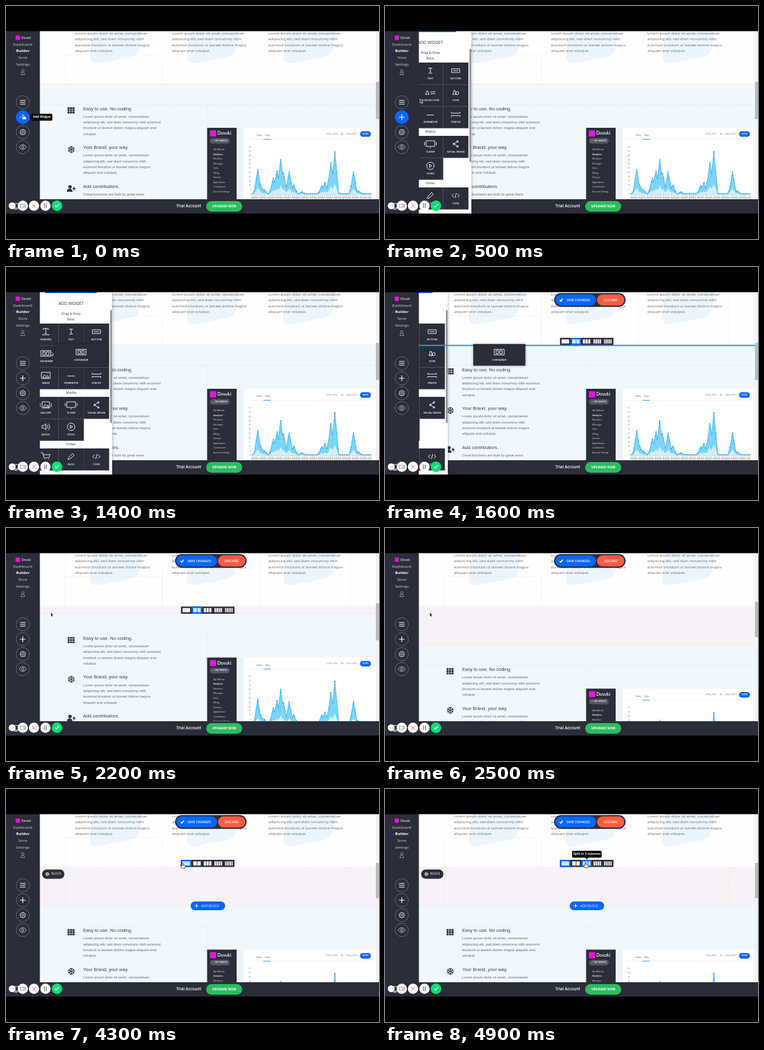
Animation of 600 by 375 pixels, one loop 5000 ms. Source, as an HTML page with a canvas:

```html
<!DOCTYPE html>
<html lang="en">
<head>
<meta charset="utf-8">
<title>Page builder demo</title>
<style>
html, body { margin: 0; width: 100%; height: 100%; overflow: hidden; background: #000; }
canvas { display: block; width: 600px; height: 375px; }
</style>
</head>
<body>
<canvas id="stage" width="600" height="375"></canvas>
<script>
const ctx = document.getElementById('stage').getContext('2d');
const LOOP = 5000, STEP = 100, PANEL_TRAVEL = 128;
const DARK = '#2b2d39', BLUE = '#0866ff', WHITE = '#fff', GREY = '#666b72', EDGE = '#d9dde2', PINK = '#e416e0';
const SANS = '"Open Sans", sans-serif', ARIAL = '"Liberation Sans", Arial, sans-serif';
const BRAND = 'Dovuki';

const ease = (t, from, to) => {
  const p = Math.min(1, Math.max(0, (t - from) / (to - from)));
  return p * p * (3 - 2 * p);
};

function box(x, y, w, h, color, r = 0) {
  ctx.fillStyle = color;
  ctx.beginPath();
  ctx.roundRect(x, y, w, h, r);
  ctx.fill();
}
function disc(x, y, r, fill, stroke) {
  ctx.beginPath();
  ctx.arc(x, y, r, 0, 7);
  if (fill) { ctx.fillStyle = fill; ctx.fill(); }
  if (stroke) { ctx.strokeStyle = stroke; ctx.lineWidth = .8; ctx.stroke(); }
}
function path(d, x, y, stroke, width = .8, fill) {
  const p = new Path2D(d);
  ctx.save();
  ctx.translate(x, y);
  if (fill) { ctx.fillStyle = fill; ctx.fill(p); }
  if (stroke) { ctx.strokeStyle = stroke; ctx.lineWidth = width; ctx.stroke(p); }
  ctx.restore();
}
function dashed(d) {
  ctx.setLineDash([1.5, 1.5]);
  path(d, .5, .5, EDGE, .6);
  ctx.setLineDash([]);
}
function text(s, x, y, size, color = WHITE, align = 'left', weight = 400, font = SANS) {
  ctx.font = `${weight} ${size}px ${font}`;
  ctx.fillStyle = color;
  ctx.textAlign = align;
  ctx.textBaseline = 'middle';
  ctx.fillText(s, x, y);
}
function gear(x, y, r, color) {
  disc(x, y, r, null, color);
  disc(x, y, r * .4, null, color);
  ctx.setLineDash([r * .39, r * .39]);
  ctx.lineWidth = r * .3;
  ctx.beginPath();
  ctx.arc(x, y, r * 1.15, 0, 6.283);
  ctx.stroke();
  ctx.setLineDash([]);
}
function shadowed(blur, paint) {
  ctx.shadowColor = '#0006';
  ctx.shadowBlur = blur;
  paint();
  ctx.shadowBlur = 0;
}

// Page
const INTRO = ['Lorem ipsum dolor sit amet, consectetuer', 'adipiscing elit, sed diam nonummy nibh',
  'euismod tincidunt ut laoreet dolore magna', 'aliquam erat volutpat.'];
const FEATURES = [
  ['Easy to use. No coding.', INTRO[0], INTRO[1] + ' euismod', 'tincidunt ut laoreet dolore magna aliquam erat', 'volutpat.'],
  ['Your Brand, your way.', ...INTRO],
  ['Add contribuitors.', 'Great business are built by great team.', 'Invite members to work on your website.']
];

function drawIntro(allColumns) {
  box(54, 40, 546, 86, '#fefefe');
  for (const x of [0, 156, 311]) {
    path('M140 40L135 81Q135 93 148 92L200 82Q213 79 215 67L220 40Z', x, 0, null, 0, '#ecf5fb');
    INTRO.forEach((line, i) => text(line, 111 + x, 44.5 + i * 9.3, 6, GREY));
  }
  dashed('M95 78H251V125M95 78V125');
  if (allColumns) dashed('M95 40V125M251 40V125M407 40V125M553 40V125');
}

function drawFeatures(push) {
  box(54, 126 + push, 546, 260, '#f0f7fd');
  dashed(`M54 125H595M54 ${125 + push}H595M54 ${158 + push}H595M323 ${158 + push}V${196 + push}`);
  FEATURES.forEach(([title, ...lines], i) => {
    const y = 165.5 + push + i * 62.5;
    text(title, 124, y, 7.5, '#3c4046', 'left', 400, ARIAL);
    lines.forEach((line, k) => text(line, 124, y + 12.7 + k * 9.3, 5.8, GREY, 'left', 400, ARIAL));
  });
  for (let i = 0; i < 9; i++) box(99 + i % 3 * 4, 163 + push + (i / 3 | 0) * 3.5, 3.4, 2.9, '#34363f', .4);
  for (let i = 0; i < 6; i++) {
    ctx.save();
    ctx.translate(105, 231 + push);
    ctx.rotate(i * Math.PI / 3);
    path('M0 0V-5.5M-2-5L0-3L2-5', 0, 0, '#34363f', 1.1);
    ctx.restore();
  }
  disc(103, 291 + push, 2.8, '#34363f');
  path('M-6 5Q-6 0-2 0Q3 0 3 5ZM3-1H8V.4H3ZM4.8-3H6.2V3H4.8Z', 104, 294 + push, null, 0, '#34363f');
}

// Chart: a tent around each peak, the highest one wins
const PEAKS = [[405, 40], [410, 14], [416, 7], [430, 26], [436, 38], [442, 56], [446.5, 34], [455.5, 36],
  [463, 15], [476, 4], [508, 14], [513, 19], [522.5, 51], [529, 69], [559, 36], [567, 5]];
const chartValue = x => Math.max(.8, ...PEAKS.map(([px, h]) => h * (1 - Math.abs(x - px) / 6.5)));
const DAYS = Array.from({ length: 60 }, (_, i) => 396 + i * 3.24);
const CHART_XS = [...DAYS, ...PEAKS.map(p => p[0])].sort((a, b) => a - b);

function drawChart() {
  const area = k => 'M396 303' + CHART_XS.map(x => `L${x} ${303 - chartValue(x) * k}`).join('') + 'V303Z';
  for (let i = 0; i < 12; i++) text(i * 5, 394, 303 - i * 6.9, 3, '#777', 'right');
  path(area(1), 0, 0, '#2aaeea', .8, '#7dd4fa');
  path(area(.25), 0, 0, null, 0, '#d6edf6');
  CHART_XS.forEach(x => disc(x, 303 - chartValue(x), .8, '#139ddd'));
  DAYS.forEach((x, i) => {
    ctx.save();
    ctx.translate(x, 305);
    ctx.rotate(-Math.PI / 2);
    text(`${i % 30 + 1} Dec`, 0, 0, 2.8, '#555', 'right');
    ctx.restore();
  });
}

function drawDashboard(push) {
  ctx.save();
  ctx.translate(0, push);
  box(371, 196, 224, 180, WHITE);
  box(371, 196, 11, 180, '#edf2f8');
  box(323.5, 196, 47.5, 180, DARK);
  box(328, 200, 10, 10, PINK, 1);
  text(BRAND, 340, 205.3, 7, WHITE, 'left', 600, 'Lato, sans-serif');
  box(328, 212.5, 32, 9, '#555762', 4.5);
  text('✓  EDIT WEBSITE', 344, 217, 3, WHITE, 'center', 600);
  ['My Website', 'Analytics', 'Members', 'Messages', 'Stats', 'Billing', 'Domain', 'Applications', 'Contributors', 'Account Settings']
    .forEach((s, i) => text(s, 333.5, 231.5 + i * 7.5, 3.4, '#e4e5e9', 'left', i == 1 ? 700 : 400));
  path('M383 214.5H588', 0, 0, '#e4e7ec', .5);
  path('M414 214.5H426', 0, 0, '#189de4', .9);
  text('Yearly', 403, 208.5, 3.2, '#555');
  text('Daily', 417, 208.5, 3.2, '#555');
  text('12 Dec, 2016', 515, 206, 3, '#666');
  text('By', 539, 206, 3, '#666');
  text('20 Jan, 2019', 547, 206, 3, '#666');
  box(569.5, 201.5, 17.5, 9, BLUE, 4.5);
  text('FILTER', 578.2, 206, 2.9, WHITE, 'center', 700);
  drawChart();
  ctx.restore();
}

// Widget panel: label and icon outline, three per row
const ICONS = {
  HEADING: 'M-4-3V-5H4V-3M0-5V3M-1.5 3H1.5M-6 5H6',
  TEXT: 'M-2.5-3V-4H2.5V-3M0-4V2M-1 2H1M-3 4H3',
  BUTTON: 'M-6.5-3H6.5V3H-6.5ZM-4 0H4',
  CONTAINER: 'M-8-4.5H8V4.5H-8ZM-5-2.5H-1V2.5H-5ZM1-2.5H5V2.5H1Z',
  'ICON SECTION': 'M-8 3L-5-3L-2 3ZM0-1H8M0 2H8',
  ICON: 'M-5 3L-2-4L1 3ZM0 1a2.5 2.5 0 1 0 5 0a2.5 2.5 0 1 0-5 0',
  IMAGE: 'M-7-5H7V5H-7ZM-5 3.5L-2-1L1 2L3 0L5 3.5ZM3-3h1',
  SEPARATOR: 'M-6 1H6',
  SPACER: 'M-7-4V-2H7V-4M-7 4V2H7V4',
  GALLERY: 'M-6-5H6V5H-6ZM-4 3.5L-1-1L2 2L3 0L5 3.5ZM-9-3V3M9-3V3',
  SLIDER: 'M-7-5H7V4H-7ZM-9.5-3V2M9.5-3V2M-1 6H1',
  'SOCIAL MEDIA': 'M3-4L-3 0L3 4M2-5h2v2h-2zM-4-1h2v2h-2zM2 3h2v2h-2z',
  AUDIO: 'M-6-2H-3L0-5V5L-3 2H-6ZM2-3q3 3 0 6M4-5q5 5 0 10',
  VIDEO: 'M-6 0a6 6 0 1 0 12 0a6 6 0 1 0-12 0M-1.5-2.5V2.5L2.5 0Z',
  STORE: 'M-8-6H-5L-3 2H5L7-3H-4M-2 4h1M4 4h1',
  BLOG: 'M-5 5L-4 2L2-5L5-2L-2 4Z',
  CODE: 'M-3-3L-6 0L-3 3M3-3L6 0L3 3M1-4L-1 4'
};
const NAMES = Object.keys(ICONS);

function widget(name, x, y, w, h, color) {
  box(x, y, w, h, color);
  path(ICONS[name], x + w / 2, y + 13, WHITE, .9);
  text(name, x + w / 2, y + 26, 4.1, WHITE, 'center', 600);
}
function widgetGroup(names, top, active) {
  names.forEach((name, i) => {
    const x = 57 + i % 3 * 40.7, y = top + (i / 3 | 0) * 35.2;
    widget(name, x, y, 40.7, 35.2, name == active ? BLUE : DARK);
    path('M0 35.2H40.7V0', x, y, '#484a55', .5);
  });
}
function drawPanel(shift, active) {
  ctx.save();
  ctx.translate(shift, 0);
  shadowed(5, () => box(54, 40, 130, 294, WHITE));
  box(76, 38, 83.5, 4, BLUE, 1);
  text('ADD WIDGET', 118, 59, 6.6, '#333', 'center');
  text('Drag & Drop', 118, 75.5, 5.3, '#333', 'center');
  text('Basic', 118, 85, 5.3, '#333', 'center');
  widgetGroup(NAMES.slice(0, 9), 91, active);
  text('Media', 118, 203, 5.6, '#333', 'center');
  widgetGroup(NAMES.slice(9, 14), 209);
  text('Other', 118, 286, 5.6, '#333', 'center');
  widgetGroup(NAMES.slice(14), 292);
  box(181, 69, 2.6, 182, '#8b8c90', 1.3);
  ctx.restore();
}

// Builder overlays
function drawSplitter(y, active, hover) {
  box(281.5, y, 86, 11.5, DARK);
  for (let n = 1; n <= 5; n++) {
    const x = 282 + (n - 1) * 17.1, on = n == active || n == hover;
    if (on) box(x - .5, y, 17, 11.5, BLUE);
    for (let k = 0; k < n; k++) box(x + 2 + k * 13 / n, y + 2.4, 13 / n - .8, 6.8, on ? '#cfe4ff' : '#eee');
  }
}
function drawTooltip(label, x, y, w) {
  box(x, y, w, 11, '#000', 1.5);
  text(label, x + w / 2, y + 5.6, 5, WHITE, 'center', 700);
}
function drawActions() {
  box(272, 42, 115, 22, DARK, 11);
  box(274, 44, 65.5, 18, BLUE, 9);
  box(341, 44, 44, 18, '#ff5b44', 9);
  path('M-2.5 0L-.7 2L2.5-2', 283.5, 53, WHITE, 1.5);
  text('SAVE CHANGES', 292, 53.2, 5.2, WHITE, 'left', 600);
  text('DISCARD', 363, 53.2, 5.2, WHITE, 'center', 600);
}
function drawBlockTools(t) {
  dashed('M95 125V188M553 125V188');
  box(58, 129.5, 36, 15, DARK, 7.5);
  gear(66.5, 137, 2.3, WHITE);
  text('BLOCK', 73, 137.2, 4.9);
  box(297, 181, 55.5, 14, BLUE, 7);
  path('M-3 0H3M0-3V3', 306.5, 188, WHITE, 1);
  text('ADD BLOCK', 314, 188.2, 5.2);
  if (t >= 3300 && t < 4200) {
    box(95.5, 125.5, 37.5, 11, BLUE);
    gear(102, 131, 2.1, WHITE);
    text('COLUMN', 108, 131.2, 4.7);
  }
}

// Frame around the page
function drawSidebar(plusActive) {
  box(0, 40, 54.5, 294, DARK);
  box(15.5, 47.5, 7, 7, PINK, 1);
  text(BRAND, 25, 51.2, 4.8, WHITE, 'left', 400, 'Lato, sans-serif');
  ['Dashboard', 'Builder', 'Store', 'Settings'].forEach((s, i) =>
    text(s, 27, 62 + i * 10.8, 6, i == 1 ? WHITE : '#d4d5d9', 'center', i == 1 ? 700 : 400));
  disc(13, 72.5, 1, BLUE);
  disc(27, 104.3, 2, null, '#a5a6ad');
  path('M-3 4Q-3 0 0 0Q3 0 3 4Z', 27, 106.5, '#a5a6ad');
  [155, 179, 203, 227].forEach((y, i) => {
    const on = i == 1 && plusActive;
    disc(27, y, 10.7, on && BLUE, on ? BLUE : '#747681');
  });
  path('M-4.5-3H4.5M-4.5 0H4.5M-4.5 3H4.5', 27, 155, WHITE, 1.2);
  path('M-4.5 0H4.5M0-4.5V4.5', 27, 179, WHITE, 1.2);
  gear(27, 203, 3.8, '#d8d9dd');
  path('M-6 0Q0-8 6 0Q0 8-6 0Z', 27, 227, '#d8d9dd');
  disc(27, 227, 1.9, null, '#d8d9dd');
}
function drawFooter() {
  box(0, 311, 600, 23, '#2b2d38');
  text('Trial Account', 274, 322.5, 6.4, WHITE, 'left', 600);
  box(322, 314, 58, 17, '#2bbd60', 8.5);
  text('UPGRADE NOW', 351, 322.8, 5.1, WHITE, 'center', 700);
}
function drawRecorder() {
  path('M-5-4H5V3H-5ZM-3 5H3', 16, 322, WHITE, 1);
  disc(10, 321.5, 5.5, WHITE);
  [27, 45, 63.5].forEach(x => disc(x, 321.5, 8.3, WHITE));
  disc(82, 321.5, 8.5, '#05df76');
  path('M-3 0h1M-.5 0h1M2 0h1', 10, 321.5, '#888', 1);
  path('M-4-2.5H2V2.5H-4ZM2-1L4.5-2.5V2.5L2 1', 27, 321.5, '#888', .8);
  path('M-3-3L3 3M3-3L-3 3', 45, 321.5, '#f0625f', 1);
  path('M-1.5-3.5V3.5M1.5-3.5V3.5', 63.5, 321.5, '#666', 1.2);
  path('M-3 0L-1 2.3L3.2-2.5', 82, 321.5, WHITE, 1.3);
}
function drawLetterbox() {
  box(0, 0, 600, 40.5, '#000');
  box(0, 334, 600, 41, '#000');
}

// Cursor stops: time, x, y
const STOPS = [[200, 28, 175], [700, 72, 136], [2500, 72, 136], [3100, 150, 146], [3200, 150, 146],
  [3700, 187, 131], [3800, 188, 131], [4400, 291, 119], [4800, 322, 119]];
function cursorAt(t) {
  let [x, y] = STOPS[0].slice(1);
  for (let i = 1; i < STOPS.length; i++) {
    const [from, x0, y0] = STOPS[i - 1], [to, x1, y1] = STOPS[i];
    if (t <= from) break;
    const p = ease(t, from, to);
    x = x0 + (x1 - x0) * p;
    y = y0 + (y1 - y0) * p;
  }
  return [x, y];
}
function drawCursor(x, y, hand) {
  const shape = hand
    ? 'M0 0Q1-1 2 0V3Q4 2 5 4V6L4 8H0L-3 4Q-2 3 0 4Z'
    : 'M0 0V6.5L1.5 5L2.6 7.6L3.8 7L2.7 4.6H4.7Z';
  path(shape, x, y, hand ? '#111' : WHITE, .7, hand ? WHITE : '#111');
}

function draw(t) {
  const slide = -PANEL_TRAVEL * (1 - ease(t, 200, 700) + ease(t, 1300, 1800));
  const push = 62.5 * ease(t, 2080, 2500);
  const dragging = t >= 1400 && t < 2000, edited = t >= 1500;
  const [cx, cy] = cursorAt(t);
  const hover = t >= 4300 && cx > 282 ? Math.floor((cx - 282) / 17.1) + 1 : 0;

  drawIntro(edited && t < 2300);
  box(54, 126, 546, push, '#f5f3f5');
  drawFeatures(push);
  drawDashboard(push);
  box(595, 40, 5, 271, '#f3f3f3');
  box(595, 122 - push * .05, 5, 60 - push * .05, '#bcbcbc');
  drawFooter();

  if (slide > -PANEL_TRAVEL) drawPanel(slide, t >= 600 && t < 1400 ? 'CONTAINER' : '');
  if (edited && t < 2000) box(54, 125.3, 541, 2, '#1b9fe8');
  if (edited) drawActions();
  if (edited && t < 2400) drawSplitter(114 + push, 2);
  if (dragging) {
    const x = 57 + 85 * ease(t, 1300, 1600);
    shadowed(4, () => box(x, 124, 83.5, 34.5, DARK));
    widget('CONTAINER', x, 124, 83.5, 34.5, DARK);
  }
  if (t >= 2800) drawBlockTools(t);
  if (t >= 3300) drawSplitter(114, 1, hover);
  if (hover > 1) {
    const x = 290.5 + (hover - 1) * 17.1;
    drawTooltip(`Split in ${hover} columns`, x - 23.7, 99.5, 47.5);
    path('M-3 0H3L0 3Z', x, 110.3, null, 0, '#000');
  }

  drawSidebar(t < 1400);
  if (t < 300) {
    drawTooltip('Add Widget', 41, 173.5, 33.5);
    path('M0-3V3L-3 0Z', 41, 179, null, 0, '#000');
  }
  drawRecorder();
  drawLetterbox();
  drawCursor(cx, cy, t < 300 || hover);
}

function tick(now) {
  draw(Math.floor(now % LOOP / STEP) * STEP);
  requestAnimationFrame(tick);
}
requestAnimationFrame(tick);
</script>
</body>
</html>
```
